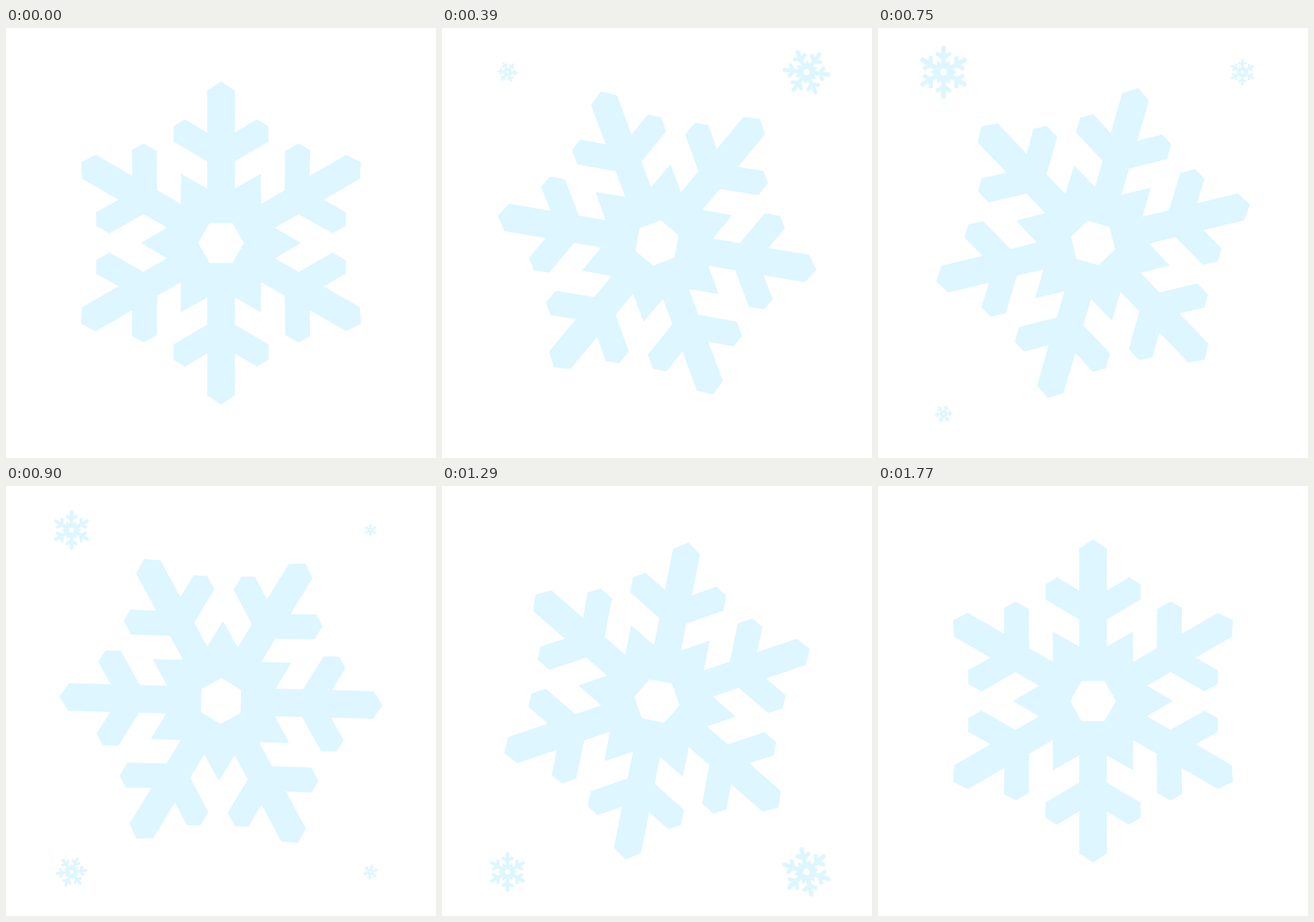
Write an HTML page with a canvas that moves like this. It is 748 px wide and 748 px high and loops after 1800 ms.

```html
<!DOCTYPE html>
<html>
<head>
<meta charset="utf-8">
<style>
html, body { margin: 0; width: 100%; height: 100%; overflow: hidden; background: #fff; }
canvas { display: block; }
</style>
</head>
<body>
<canvas id="stage" width="748" height="748"></canvas>
<script>
const ctx = document.getElementById('stage').getContext('2d');
const LOOP = 1800, STEP = 30, RAD = Math.PI / 180;

// Right half of the upward arm, from tip to the notch between arms.
const half = [
  [24, -265], [24, -192], [62.5, -215], [82.5, -203],
  [82.5, -176.5], [24, -142], [24, -94.5]
];
const arm = [
  ...half.map(([x, y]) => [-x, y]).reverse(),
  [0, -281],
  ...half,
  [69.5, -120.4]
];

function makeFlake() {
  const path = new Path2D();
  for (let i = 0; i < 6; i++) {
    const c = Math.cos(i * 60 * RAD), s = Math.sin(i * 60 * RAD);
    for (const [x, y] of arm) path.lineTo(x * c - y * s, x * s + y * c);
  }
  path.closePath();
  for (let i = 0; i < 6; i++) {
    const a = i * 60 * RAD, x = 40 * Math.cos(a), y = 40 * Math.sin(a);
    i ? path.lineTo(x, y) : path.moveTo(x, y);
  }
  path.closePath();
  return path;
}
const flake = makeFlake();

// Small flakes: position, time of full size, last visible time, sideways drift per ms.
const small = [
  { x: 634, y: 76.8, peak: 450, end: 900, drift: 0 },
  { x: 114, y: 76.8, peak: 750, end: 1200, drift: 0 },
  { x: 114, y: 671.3, peak: 1140, end: 1590, drift: 0 },
  { x: 634, y: 671.3, peak: 1320, end: 1620, drift: 0.0275 }
];

function drawFlake(x, y, scale, deg) {
  ctx.save();
  ctx.translate(x, y);
  ctx.rotate(deg * RAD);
  ctx.scale(scale, scale);
  ctx.fill(flake, 'evenodd');
  ctx.restore();
}

function draw(t) {
  ctx.fillStyle = '#fff';
  ctx.fillRect(0, 0, 748, 748);
  ctx.fillStyle = '#ddf6ff';
  drawFlake(374, 374, 1, 180 * t / (LOOP - STEP));
  for (const f of small) {
    const d = t - f.peak;
    if (d <= -450 || t > f.end) continue;
    const x = f.x + Math.max(0, d) * f.drift;
    drawFlake(x, f.y, (1 - Math.abs(d) / 600) / 6, d * 0.4);
  }
}

const start = performance.now();
function tick() {
  const t = (performance.now() - start) % LOOP;
  draw(Math.floor(t / STEP) * STEP);
  requestAnimationFrame(tick);
}
tick();
</script>
</body>
</html>
```
